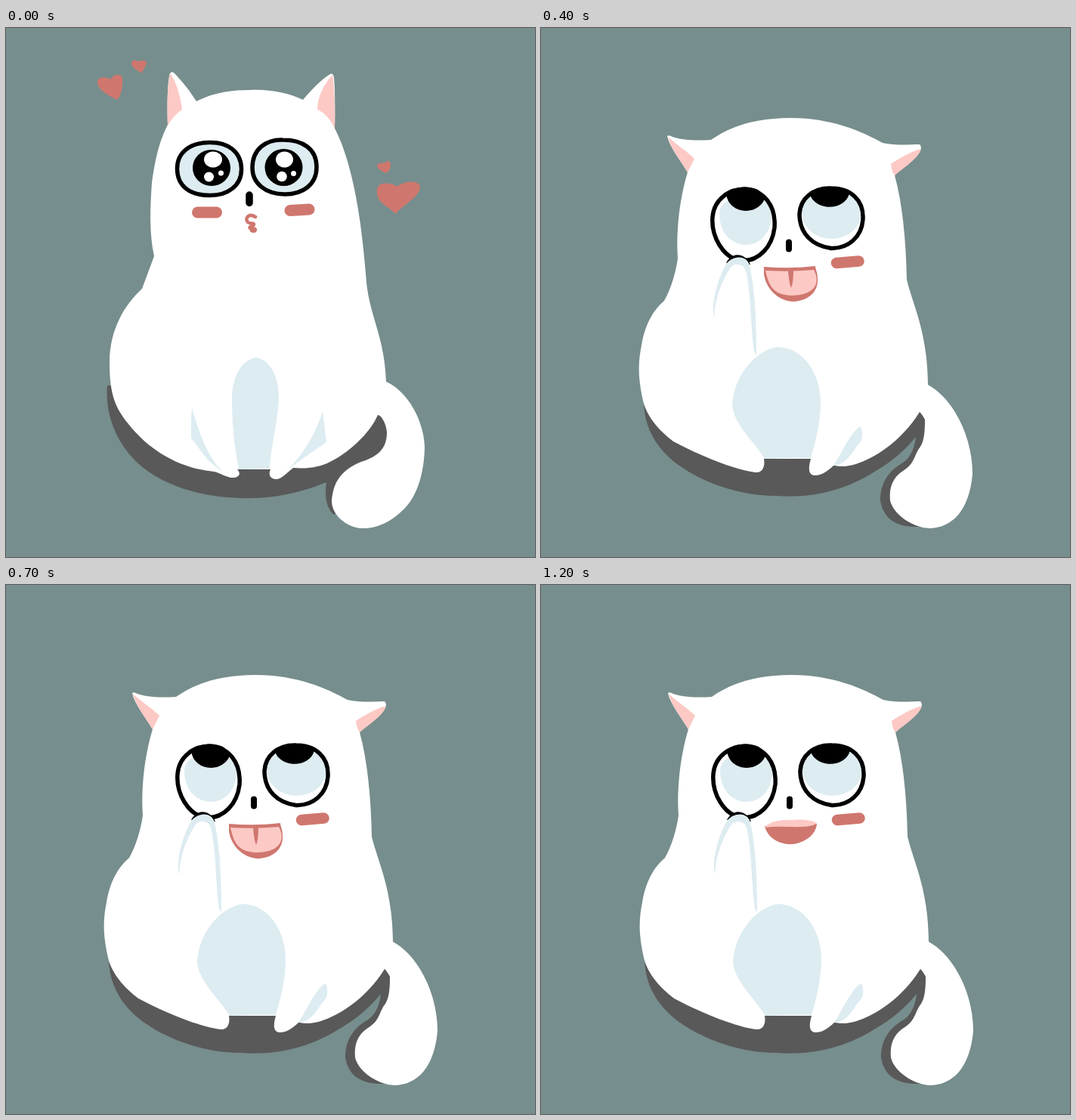
An HTML page for the animation above (1.3 s loop, 700 px wide and 700 px high).

```html
<!DOCTYPE html>
<html>
<head>
<meta charset="utf-8">
<title>Cat</title>
<style>
html, body { margin: 0; width: 100%; height: 100%; overflow: hidden; background: #768e8d; }
svg { display: block; width: 100vw; height: 100vh; }
.white { fill: #fff; }
.shade { fill: #595959; }
.blue { fill: #ddecf1; }
.pink { fill: #fcc9c5; }
.red { fill: #cf776e; }
.line { fill: none; stroke-linecap: round; stroke-linejoin: round; }
.ink { stroke: #000; }
.blush { stroke: #cf776e; }
</style>
</head>
<body>
<svg viewBox="0 0 700 700">
  <g id="kiss">
    <path class="shade" d="M134 473C131 513 146 551 179 580C214 608 262 621 310 622C360 624 400 611 424 601C421 620 424 636 434 644L470 620L510 560L500 505L300 480Z"/>
    <path class="white" d="M214 128C213 95 214 68 217 60Q220 56 224 61C235 73 243 83 252 97C275 85 300 82 324 82C350 81 373 86 393 95C404 82 417 68 429 61Q433 59 434 66C436 88 435 110 435 133C452 165 463 215 469 260C474 298 476 325 478 345C484 386 501 412 503 468C532 481 553 520 554 555C553 600 538 627 525 638C506 657 485 663 468 662C445 658 431 641 431 626C433 603 441 586 470 574C493 567 504 556 504 535C503 522 496 512 492 512C482 536 452 564 425 576C408 583 392 583 380 582C370 590 364 598 356 597C349 596 347 590 350 584L306 584C312 590 308 596 297 595C287 592 281 588 275 587C233 583 192 562 162 524C141 499 137 477 137 440C138 400 155 368 180 345L196 302C189 270 191 235 193 205C198 170 203 150 214 128Z"/>
    <path class="pink" d="M217 60C213 82 213 110 214 129C220 119 227 112 233 108C231 90 225 70 217 60ZM432 62C420 75 412 92 412 108C422 112 430 122 435 133C436 110 435 80 432 62Z"/>
    <path class="blue" d="M331 436C310 439 299 465 299 490C299 525 302 552 308 584L349 583C350 555 360 522 361 488C361 465 352 440 331 436ZM246 503C244 520 245 535 245 543C256 556 263 568 270 574Q278 582 288 588C268 570 257 540 246 503ZM419 507L424 548C408 559 386 574 370 587C387 572 409 541 419 507Z"/>
    <path class="blue ink" stroke-width="5.500" d="M226.500 187C226 164 244 152 268 151.500C294 150.500 311 164 311.500 186C312 209 293 221.500 270 221.500C244 221.500 227 210 226.500 187ZM326 185C326 160 344 147.500 366 148C393 148 411 160 411 184C411 208 392 220 369 220C344 220 326 206 326 185Z"/>
    <path class="line ink" stroke-width="9.500" d="M322 221V231.500"/>
    <path class="line blush" stroke-width="15" d="M253.500 244H278.500M376 241.500L401 240"/>
    <path class="line blush" stroke-width="4.500" d="M330 250C320 244 316 253 320 257C323 260 328 257 328 260C327 263 321 262 323 265C325 267 329 264 330 267Q329 270 325 268"/>
    <g id="gazeA">
      <ellipse cx="272" cy="185" rx="25" ry="24"/>
      <ellipse cx="367.500" cy="184.500" rx="25" ry="24.500"/>
      <g class="white">
        <ellipse cx="274" cy="174" rx="12" ry="10.500"/><circle cx="268.500" cy="197" r="6.500"/><circle cx="284.500" cy="192" r="3.500"/>
        <ellipse cx="368.500" cy="174" rx="11.500" ry="10.500"/><circle cx="365" cy="196.500" r="6.800"/><circle cx="380.500" cy="192.500" r="3.500"/>
      </g>
      <path class="red" d="M121 72C121 64 132 64 138 68C143 60 153 61 154 66C155 78 152 90 147 95C140 91 122 84 121 72ZM166 47C167 41 173 42 175 45C178 42 186 42 186 46C186 50 180 56 180 60C174 56 166 52 166 47ZM491 182C491 178 499 179 502 178C506 174 509 176 509 182C509 188 504 191 503 192C498 190 491 186 491 182ZM491 213C493 203 509 204 518 210C524 203 546 200 548 210C547 224 528 232 515 246C508 236 488 232 491 213Z"/>
    </g>
    <g id="gazeB">
      <ellipse cx="271.500" cy="185" rx="25" ry="24"/>
      <ellipse cx="363" cy="184.500" rx="23.500" ry="24.500"/>
      <g class="white">
        <ellipse cx="263" cy="174.500" rx="12" ry="10.500"/><circle cx="271" cy="198.500" r="6.500"/><circle cx="283.500" cy="191.500" r="3.500"/>
        <ellipse cx="354" cy="174.500" rx="11.500" ry="10.500"/><circle cx="371.500" cy="198" r="6.800"/><circle cx="382.500" cy="191" r="3.500"/>
      </g>
      <path class="red" d="M112 72C113 61 127 61 133 62C140 52 156 49 159 61C160 75 150 80 146 94C136 90 113 88 112 72ZM167 47C168 43 172 44 174 45C177 41 182 42 181 46C181 50 179 53 177 56C172 53 167 51 167 47ZM485 180C487 173 494 174 496 174C500 164 511 161 513 166C514 176 506 184 505 193C498 191 487 188 485 180ZM498 217C500 207 511 208 517 211C525 203 540 203 541 213C540 225 526 228 520 239C514 235 498 231 498 217Z"/>
    </g>
  </g>

  <g id="tease">
    <path class="shade" d="M136 496C137 530 153 556 180 577C220 606 270 619 310 619C362 623 405 610 440 588C465 574 483 557 496 541C494 560 486 572 476 577C455 590 449 608 449 625C453 652 474 661 500 660L530 600L515 510L500 505L300 480Z"/>
    <path class="white" d="M167 143Q169 141 174 144C190 149 205 149 225 148C250 130 285 119 330 119C385 119 425 137 452 152C470 156 490 154 501 154C506 159 500 168 493 173Q482 181 468 195C479 235 483 285 484 333C493 370 511 400 512 472C545 490 571 540 571 590C567 637 545 662 513 662C488 660 465 641 462 625C460 605 468 592 482 584C495 575 494 564 502 554C508 545 508 528 508 518Q504 511 501 508C485 535 455 562 425 574C405 582 397 580 387 579C380 586 370 593 361 592C353 590 354 581 357 570H295C297 582 292 589 283 588C250 583 205 563 175 547C150 528 140 510 136 497C127 460 129 440 133 420C138 390 150 372 163 361C172 345 178 325 181 305C178 265 185 220 194 191C185 175 170 158 167 143Z"/>
    <path class="pink" d="M168 144C180 155 193 163 203 173L194 191C184 175 172 160 168 144ZM503 160C490 163 470 175 463 180Q464 190 468 195C480 185 500 172 503 160Z"/>
    <path class="blue" d="M315 422C290 423 255 455 253 500C256 525 280 545 296 570Q330 568 357 569C364 545 370 520 370 495C370 460 350 425 315 422ZM423 527C428 540 424 548 418 553C405 575 395 579 387 579C395 568 410 533 423 527Z"/>
    <path class="blue" d="M236 245C238 215 303 215 305 245C306 301 236 301 236 245ZM345 242C348 208 424 208 424 242C424 291 345 291 345 242Z"/>
    <path d="M245 219C248 249 292 249 297 222L287 214Q270 207 255 213ZM355 217C360 243 402 243 408 219Q383 203 355 217Z"/>
    <path class="line ink" stroke-width="5.500" d="M268 213.500C295 214 311 235 309 264C306 290 288 308 267 308C240 306 225 274 227 250C229 226 250 213 268 213.500ZM384 212C410 212 427 228 426 252C425 277 406 292 384 291.500C360 288 342 273 342 246C343 226 360 211 384 212Z"/>
    <path d="M245 311C252 296 270 297 277 313Z"/>
    <path class="white" d="M248 312C256 301 270 302 275 316L283 350L240 350Z"/>
    <path class="blue" d="M229 384C224 363 236 326 246 311C255 301 272 300 276 314C284 350 285 395 285 433L282 428C277 392 278 350 271 321C268 311 255 311 251 317C240 333 230 358 229 384Z"/>
    <path class="line ink" stroke-width="8" d="M328 283.500V292.500"/>
    <path class="line blush" stroke-width="14.500" d="M391 311L420.500 308.500"/>
    <g id="tongue">
      <path class="red" d="M295 316Q330 319 363 315C363 320 366 322 366 332C367 349 354 361 334 362C313 361 298 345 295 326Z"/>
      <path class="pink" d="M297 321Q330 323 361 320C372 340 358 354 332 354C309 353 302 344 297 321Z"/>
      <path class="red" d="M327 320H334Q334 337 331 344Q328 337 327 320Z"/>
    </g>
    <g id="smile">
      <path class="red" d="M295 319C299 335 314 343 330 343C348 342 363 330 364 316Z"/>
      <path class="pink" d="M295 321Q303 310 328 311Q355 309 364 315Q358 321 330 320Q307 319 295 321Z"/>
    </g>
  </g>
</svg>
<script>
const el = id => document.getElementById(id);
const show = (id, on) => el(id).style.display = on ? '' : 'none';
const STEP = 100, STEPS = 13, KISS_STEPS = 4;

function draw(now) {
  const step = Math.floor(now / STEP) % STEPS;
  const kissing = step < KISS_STEPS;
  show('kiss', kissing);
  show('tease', !kissing);
  show('gazeA', step % 2 === 0);
  show('gazeB', step % 2 === 1);

  // Tongue out, half drawn in, then an open smile
  const pose = (step - KISS_STEPS + 3) % 3;
  show('tongue', pose < 2);
  show('smile', pose === 2);
  el('tongue').setAttribute('transform', pose === 1 ? 'translate(0 63.6) scale(1 .8)' : '');
  el('tease').setAttribute('transform', `translate(${pose / 2} 0)`);
}

const start = performance.now();
function tick() {
  draw(performance.now() - start);
  requestAnimationFrame(tick);
}
tick();
</script>
</body>
</html>
```
